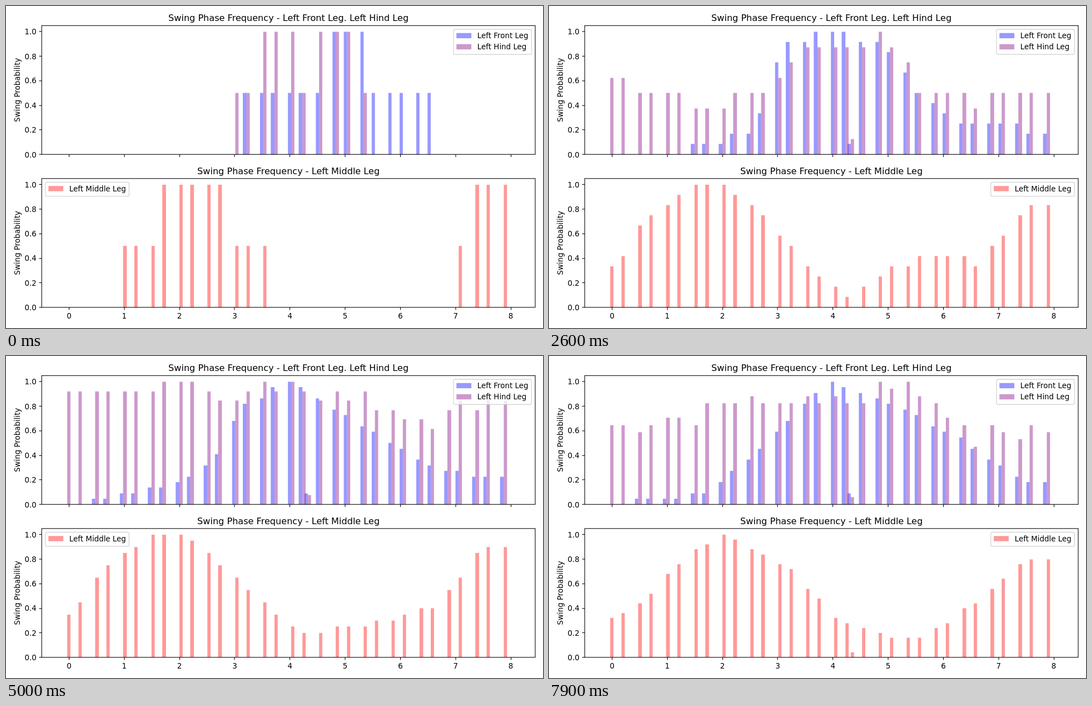
Recreate the animation shown at these times as an HTML page. Size 966 by 580 pixels, loop 8 s.

```html
<!DOCTYPE html>
<html lang="en">
<head>
<meta charset="utf-8">
<title>Swing Phase Frequency</title>
<style>
  html, body { margin: 0; width: 100%; height: 100%; overflow: hidden; background: #fff; }
  svg { display: block; width: 100%; height: 100%; font: 13.889px "DejaVu Sans", sans-serif; }
  .title { font-size: 16.667px; }
  .mid { text-anchor: middle; }
  .end { text-anchor: end; }
  .line { fill: none; stroke: #000; stroke-width: 1.11; }
  .frame { fill: #fff; fill-opacity: .8; stroke: #ccc; stroke-opacity: .8; stroke-width: 1.39; }
</style>
</head>
<body>
<!-- The figure is laid out at 10 x 6 inches, 100 dpi, 1 pt = 1.389 units. -->
<svg id="stage" viewBox="0 0 1000 600" preserveAspectRatio="none"></svg>
<script>
const LOOP = 8000;
const LEFT = 66.5, RIGHT = 985.5, HEIGHT = 240, FULL = HEIGHT / 1.05;
const TOP = 36.5, BOTTOM = 321.5;
const ORIGIN = 117.4, UNIT = 102.83, BAR = 0.06 * UNIT;
const EM = 13.889, TICK = 4.86;
const BLUE = '#00f', PURPLE = '#800080', RED = '#f00';

const stage = document.getElementById('stage');

function add(parent, tag, attrs, text) {
  const node = document.createElementNS('http://www.w3.org/2000/svg', tag);
  for (const key in attrs) node.setAttribute(key, attrs[key]);
  if (text !== undefined) node.textContent = text;
  parent.appendChild(node);
  return node;
}

const snap = v => Math.floor(v) + 0.5;
const lerp = (a, b, p) => a + (b - a) * p;
const clamp = v => Math.min(1, Math.max(0, v));

// Bins alternate 2 and 3 samples apart on an 80-sample axis; one rare bin sits at the middle.
const BINS = 33, RARE = 18;
function binTime(k) {
  const sample = k < RARE ? Math.floor(2.5 * k) : k === RARE ? 43 : Math.ceil(2.5 * (k - 1));
  return sample * 8 / 79;
}

// Each series is a curve through a few knots; its knot heights and the number
// of averaged swings settle from one key moment to the next.
const moments = [0, 1600, 5000, 7900];
const front = {
  knots: [0, 1.7, 2.6, 3.2, 4, 5, 5.6, 6.5, 7.5],
  swings: [2, 5, 22, 22],
  heights: [
    [0, 0, 0, .33, .4, 1, .6, .4, 0],
    [0, 0, .15, 1, 1, 1, .4, .15, .2],
    [0, .13, .31, .8, 1, .75, .58, .33, .22],
    [0, .08, .41, .67, 1, .85, .7, .5, .18]
  ]
};
const hind = {
  knots: [0, .8, 2, 2.8, 3.5, 4.2, 5, 5.5, 6.5, 7.2],
  swings: [2, 5, 13, 17],
  jitter: .08,
  heights: [
    [0, 0, 0, 0, .9, .73, 1, .25, 0, 0],
    [.4, .2, 0, .25, .8, .8, 1, .4, .3, .3],
    [.93, .87, .97, .88, .92, .93, .88, .83, .62, .85],
    [.65, .6, .76, .85, .8, .82, .98, .95, .55, .6]
  ]
};
const middle = {
  knots: [0, .6, 1.5, 2.1, 3.2, 4.2, 5.5, 6.7, 7.5],
  swings: [2, 6, 20, 25],
  heights: [
    [0, 0, .7, 1.2, .48, 0, 0, 0, 1],
    [.33, .67, 1, 1, .5, 0, .5, .33, .8],
    [.35, .7, 1, 1, .57, .2, .27, .42, .92],
    [.32, .48, .88, 1, .72, .27, .13, .48, .8]
  ]
};

// Runs of updates, 100 ms apart within a run.
const runs = [
  [0, 0], [600, 600], [1000, 1100], [1600, 1600], [2000, 2000], [2200, 2200], [2600, 2600],
  [2800, 2900], [3200, 3300], [3600, 3700], [3900, 3900], [4100, 4100], [4300, 4400],
  [4600, 4600], [4800, 5100], [5400, 5600], [5900, 6200], [6400, 7400], [7600, 7900]
];
const steps = [];
for (const [from, to] of runs) for (let t = from; t <= to; t += 100) steps.push(t);

const lastAt = (list, value) => Math.max(0, list.findLastIndex(v => v <= value));

function along(knots, heights, x) {
  const i = lastAt(knots, x);
  if (i === knots.length - 1) return heights[i];
  return lerp(heights[i], heights[i + 1], (x - knots[i]) / (knots[i + 1] - knots[i]));
}

function noise(k) {
  const v = Math.sin(k * 12.9898 + 4) * 43758.5453;
  return (v - Math.floor(v)) * 2 - 1;
}

function barHeights({ knots, swings, heights, jitter = 0 }, time) {
  const i = Math.min(lastAt(moments, time), moments.length - 2);
  const progress = (time - moments[i]) / (moments[i + 1] - moments[i]);
  const settle = 1 - (1 - progress) ** 1.5;
  const total = Math.round(lerp(swings[i], swings[i + 1], settle));
  const counts = Array.from({ length: BINS }, (_, k) => {
    const x = binTime(k);
    const height = lerp(along(knots, heights[i], x), along(knots, heights[i + 1], x), settle)
      + jitter * noise(k) * time / LOOP;
    return Math.round(total * clamp(height) * (k === RARE ? .08 : 1));
  });
  const max = Math.max(...counts);
  return counts.map(n => n / max);
}

function addBars(base, color, shift) {
  const bars = [];
  for (let k = 0; k < BINS; k++) {
    const left = ORIGIN + binTime(k) * UNIT + (shift - 0.5) * BAR;
    const x = Math.round(left);
    bars.push(add(stage, 'rect', { x, width: Math.round(left + BAR) - x, fill: color, 'fill-opacity': .4 }));
  }
  return heights => bars.forEach((bar, k) => {
    const y = Math.round(base - FULL * heights[k]);
    bar.setAttribute('y', y);
    bar.setAttribute('height', Math.max(0, base - y));
  });
}

function addAxes(top, title, labelled) {
  const base = top + HEIGHT;
  add(stage, 'rect', { class: 'line', x: LEFT, y: top, width: RIGHT - LEFT, height: HEIGHT });
  for (let i = 0; i <= 8; i++) {
    const x = ORIGIN + i * UNIT;
    add(stage, 'path', { class: 'line', d: `M${snap(x)} ${base}v${TICK}` });
    if (labelled) add(stage, 'text', { class: 'mid', x, y: base + 20.5 }, i);
  }
  for (let i = 0; i <= 5; i++) {
    const y = base - FULL * i / 5;
    add(stage, 'path', { class: 'line', d: `M${LEFT} ${snap(y)}h${-TICK}` });
    add(stage, 'text', { class: 'end', x: LEFT - 2 * TICK, y: Math.round(y + 5) }, (i / 5).toFixed(1));
  }
  const center = (LEFT + RIGHT) / 2;
  add(stage, 'text', { class: 'title mid', x: center, y: top - 8.5 }, title);
  add(stage, 'text', { class: 'mid', transform: `translate(26 ${top + HEIGHT / 2}) rotate(-90)` }, 'Swing Probability');
}

function addLegend(top, width, entries) {
  const group = add(stage, 'g', {});
  const row = 20.8, handle = 2 * EM, pad = .4 * EM;
  add(group, 'rect', { class: 'frame', width, height: row * entries.length + 5.2, rx: .2 * EM });
  entries.forEach(([label, color], i) => {
    const y = 11.8 + row * i;
    add(group, 'rect', { x: pad, y: y - .35 * EM, width: handle, height: .7 * EM, fill: color, 'fill-opacity': .4 });
    add(group, 'text', { x: pad + handle + .8 * EM, y: y + 5 }, label);
  });
  const gap = EM / 2;
  const places = { left: LEFT + gap, center: (LEFT + RIGHT - width) / 2, right: RIGHT - gap - width };
  return place => group.setAttribute('transform', `translate(${places[place]} ${top + gap})`);
}

const plots = [
  { series: front, draw: addBars(TOP + HEIGHT, BLUE, -1) },
  { series: hind, draw: addBars(TOP + HEIGHT, PURPLE, 0) },
  { series: middle, draw: addBars(BOTTOM + HEIGHT, RED, 0) }
];
addAxes(TOP, 'Swing Phase Frequency - Left Front Leg. Left Hind Leg', false);
addAxes(BOTTOM, 'Swing Phase Frequency - Left Middle Leg', true);

const legends = [
  {
    move: addLegend(TOP, 145.3, [['Left Front Leg', BLUE], ['Left Hind Leg', PURPLE]]),
    plan: [[0, 'right'], [3200, 'left'], [3300, 'right'], [4300, 'left'], [4400, 'right'], [6100, 'left'], [7100, 'right']]
  },
  {
    move: addLegend(BOTTOM, 155.8, [['Left Middle Leg', RED]]),
    plan: [[0, 'left'], [600, 'right'], [1000, 'center'], [1600, 'right'], [4800, 'left'], [5400, 'right']]
  }
];

let shown = -1;
function render(time) {
  const step = lastAt(steps, time);
  if (step === shown) return;
  shown = step;
  for (const { series, draw } of plots) draw(barHeights(series, steps[step]));
  for (const { move, plan } of legends) move(plan[lastAt(plan.map(([at]) => at), time)][1]);
}

const start = performance.now();
function tick() {
  render((performance.now() - start) % LOOP);
  requestAnimationFrame(tick);
}
tick();
</script>
</body>
</html>
```
